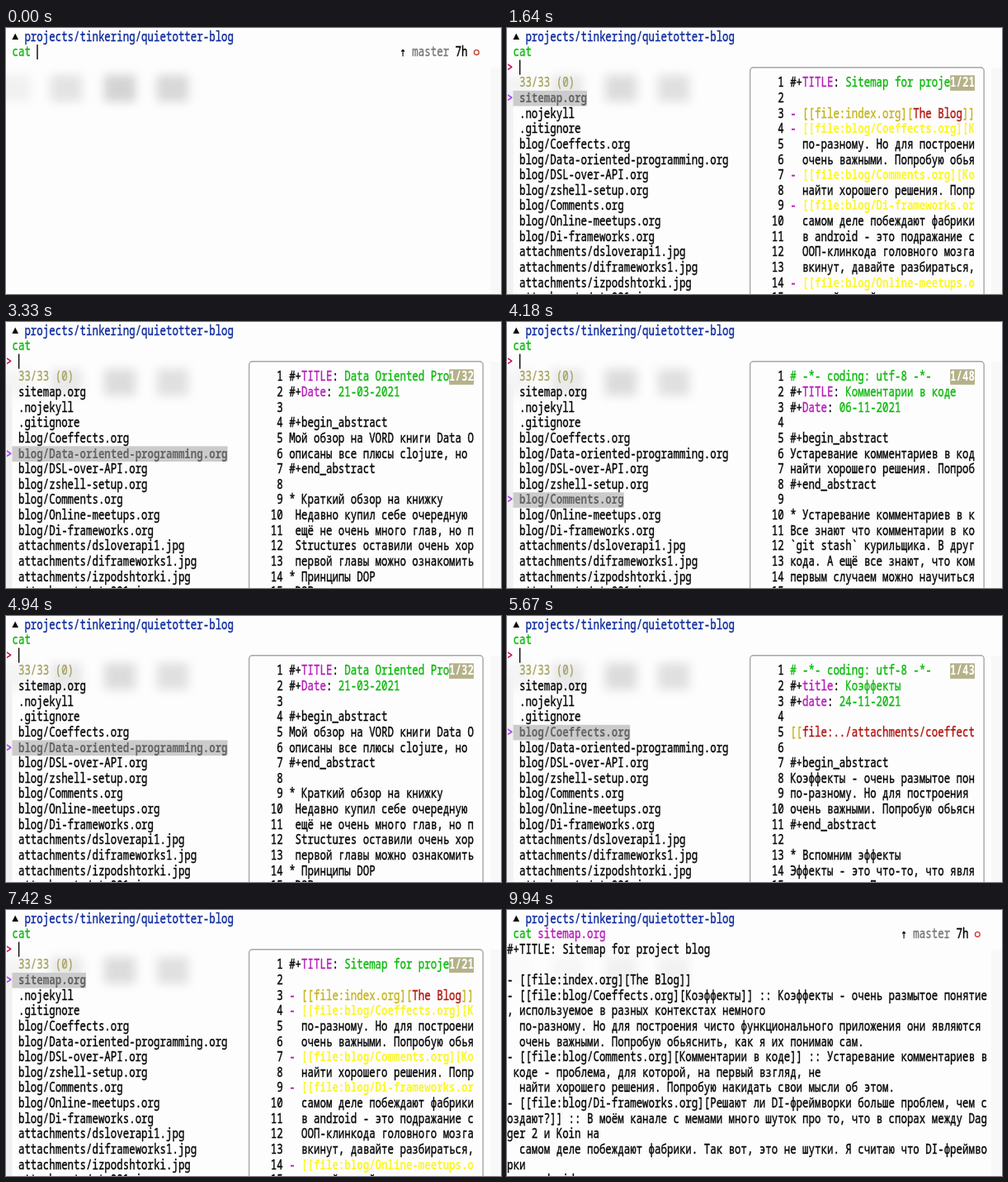
An HTML page with a canvas for the animation above (10000 ms loop, 600 px wide and 322 px high).

```html
<!DOCTYPE html>
<html lang="ru">
<head>
<meta charset="utf-8">
<title>Terminal file picker</title>
<style>
  html, body { margin: 0; width: 100%; height: 100%; overflow: hidden; background: #fefdfe; }
  canvas { display: block; width: 100%; height: 100%; }
</style>
</head>
<body>
<canvas id="stage" width="600" height="322"></canvas>
<script>
const ctx = document.getElementById('stage').getContext('2d');
const LOOP = 10000, CELL = 7.46, ROW = 18.62, BASELINE = 15.6;
const PREVIEW_COLUMNS = 30;
const FACE = "15.4px 'Noto Sans Mono', 'DejaVu Sans Mono', monospace";
const INK = '#050505', BLUE = '#0c2a9c', GREEN = '#0cba0c', MAGENTA = '#b61cb8',
      OLIVE = '#a5a35f', GOLD = '#c3b41c', YELLOW = '#fbf62e', RED = '#b3160f', PURPLE = '#a337f5';

const FILES = ['sitemap.org', '.nojekyll', '.gitignore', 'blog/Coeffects.org',
  'blog/Data-oriented-programming.org', 'blog/DSL-over-API.org', 'blog/zshell-setup.org',
  'blog/Comments.org', 'blog/Online-meetups.org', 'blog/Di-frameworks.org',
  'attachments/dsloverapi1.jpg', 'attachments/diframeworks1.jpg',
  'attachments/izpodshtorki.jpg', 'attachments/mts001.jpg'];

const SITEMAP = `#+TITLE: Sitemap for project blog

- [[file:index.org][The Blog]]
- [[file:blog/Coeffects.org][Коэффекты]] :: Коэффекты - очень размытое понятие, используемое в разных контекстах немного
  по-разному. Но для построения чисто функционального приложения они являются
  очень важными. Попробую обьяснить, как я их понимаю сам.
- [[file:blog/Comments.org][Комментарии в коде]] :: Устаревание комментариев в коде - проблема, для которой, на первый взгляд, не
  найти хорошего решения. Попробую накидать свои мысли об этом.
- [[file:blog/Di-frameworks.org][Решают ли DI-фреймворки больше проблем, чем создают?]] :: В моём канале с мемами много шуток про то, что в спорах между Dagger 2 и Koin на
  самом деле побеждают фабрики. Так вот, это не шутки. Я считаю что DI-фреймворки
  в android - это подражание светлым идеям
  ООП-клинкода головного мозга
  вкинут, давайте разбираться,
- [[file:blog/Online-meetups.org][Онлайн
  первый онлайн митап`;

// Previews by list position: number of lines in the file and its beginning
const PREVIEWS = [
  [21, SITEMAP],
  [0, ''],
  [3, ''],
  [43, `# -*- coding: utf-8 -*-
#+title: Коэффекты
#+date: 24-11-2021

[[file:../attachments/coeffects.jpg]]

#+begin_abstract
Коэффекты - очень размытое понятие
по-разному. Но для построения
очень важными. Попробую обьяснить
#+end_abstract

* Вспомним эффекты
Эффекты - это что-то, что является
результатом. Про`],
  [32, `#+TITLE: Data Oriented Programming
#+Date: 21-03-2021

#+begin_abstract
Мой обзор на VORD книги Data Oriented
описаны все плюсы clojure, но
#+end_abstract

* Краткий обзор на книжку
 Недавно купил себе очередную
 ещё не очень много глав, но п
 Structures оставили очень хорошее
 первой главы можно ознакомиться
* Принципы DOP
 DOP`],
  [40, `#+TITLE: DSL over API\n\n#+begin_abstract\n#+end_abstract`],
  [40, `#+TITLE: zshell setup\n\n#+begin_abstract\n#+end_abstract`],
  [48, `# -*- coding: utf-8 -*-
#+TITLE: Комментарии в коде
#+Date: 06-11-2021

#+begin_abstract
Устаревание комментариев в коде
найти хорошего решения. Попробую
#+end_abstract

* Устаревание комментариев в коде
Все знают что комментарии в коде
\`git stash\` курильщика. В других
кода. А ещё все знают, что комментарии
первым случаем можно научиться
писать`],
].map(([total, body]) => ({ total, lines: body ? body.split('\n') : [] }));

const OUTPUT = SITEMAP.split('\n').flatMap(line => line.match(/.{1,78}/gu) || ['']);

const OPEN = 500, CHOOSE = 8580, RUN = 8880;
const MOVES = [[0, 0], [2580, 1], [2780, 2], [2980, 3], [3160, 4], [3610, 5], [3780, 6], [3950, 7],
  [4500, 6], [4680, 5], [4860, 4], [5580, 3], [6000, 2], [6200, 1], [6940, 0]];

// The typeface is narrowed as a whole so that one glyph fills one terminal cell.
// Regular text gets a hairline outline for a medium weight.
function text(value, col, row, color = INK, bold = false) {
  ctx.font = `${bold ? 700 : 500} ${FACE}`;
  ctx.fillStyle = ctx.strokeStyle = color;
  ctx.lineWidth = 0.4;
  ctx.save();
  ctx.translate(col * CELL, BASELINE + row * ROW);
  ctx.scale(CELL / ctx.measureText('M').width, 1);
  ctx.fillText(value, 0, 0);
  if (!bold) ctx.strokeText(value, 0, 0);
  ctx.restore();
}

function fillCells(col, row, count, color) {
  ctx.fillStyle = color;
  ctx.fillRect(col * CELL, 1.4 + row * ROW, count * CELL, ROW);
}

function cursor(col, row) {
  ctx.fillStyle = INK;
  ctx.fillRect(col * CELL, 1.4 + row * ROW, 1.4, ROW - 0.6);
}

function backdrop(strength) {
  ctx.fillStyle = '#fefdfe';
  ctx.fillRect(0, 0, 600, 322);
  ctx.fillStyle = '#f8f8f8';
  ctx.fillRect(587, 48, 13, 274);
  ctx.save();
  ctx.filter = 'blur(6px)';
  ctx.fillStyle = '#c9c9c9';
  [[-8, 0.25], [54, 0.55], [119, 0.9], [183, 0.8]].forEach(([x, alpha]) => {
    ctx.globalAlpha = alpha * strength;
    ctx.fillRect(x, 57, 38, 32);
  });
  ctx.restore();
}

function header() {
  ctx.fillStyle = INK;
  ctx.beginPath();
  ctx.moveTo(11.2, 6.5);
  ctx.lineTo(15, 14);
  ctx.lineTo(7.4, 14);
  ctx.fill();
  text('projects/tinkering/quietotter-blog', 3, 0, BLUE);
  text('cat', 1, 1, GREEN);
}

function gitStatus() {
  text('⇡', 64, 1);
  text('master', 66, 1, '#777');
  text('7h', 73, 1);
  ctx.strokeStyle = '#c5382c';
  ctx.lineWidth = 1.3;
  ctx.beginPath();
  ctx.arc(570.3, 29.6, 2.9, 0, Math.PI * 2);
  ctx.stroke();
}

// Splits a line into [text, color, bold] parts.
function highlight(line) {
  const keyword = line.match(/^(#\+)(title|date)(:)(.*)/i);
  if (keyword) return [INK, MAGENTA, INK, GREEN].map((color, i) => [keyword[i + 1], color]);
  if (line.startsWith('# ')) return [[line, GREEN]];
  if (line.startsWith('- [[file:index'))
    return [['- ', MAGENTA], ['[[file:index.org][', GOLD], ['The Blog', RED], [']]', GOLD]];
  if (line.startsWith('- [[')) return [['- ', MAGENTA], [line.slice(2), YELLOW, true]];
  if (line.startsWith('[[')) return [['[[', GOLD], [line.slice(2), RED]];
  return [[line, INK]];
}

function preview({ total, lines }) {
  ctx.strokeStyle = '#a6a6a6';
  ctx.lineWidth = 1.4;
  ctx.beginPath();
  ctx.roundRect(39.5 * CELL, 47.7, 38 * CELL, 300, 4);
  ctx.stroke();
  lines.forEach((line, i) => {
    const row = 3 + i;
    text(String(i + 1).padStart(2), 43, row);
    let col = 46;
    for (const [part, color, bold] of highlight(line.slice(0, PREVIEW_COLUMNS))) {
      text(part, col, row, color, bold);
      col += part.length;
    }
  });
  if (total) {
    fillCells(72, 3, 4, '#b5b28a');
    text(`1/${total}`.padStart(4), 72, 3, '#fff', true);
  }
}

function picker(selected) {
  text('>', 0, 2, '#c4105c', true);
  cursor(2, 2);
  text('33/33 (0)', 2, 3, OLIVE);
  ctx.fillStyle = '#f1f1f1';
  ctx.fillRect(0, 76, CELL, 246);
  FILES.forEach((name, i) => {
    const row = 4 + i, current = i === selected;
    if (current) {
      fillCells(1, row, name.length + 1, '#cbcbcb');
      text('>', 0, row, PURPLE, true);
    }
    text(name, 2, row, current ? '#666' : INK, current);
  });
  preview(PREVIEWS[selected]);
}

function draw(t) {
  const picking = t >= OPEN && t < CHOOSE;
  backdrop(t >= RUN ? 0.25 : picking ? 0.7 : 0.9);
  header();
  if (picking) {
    picker(MOVES.findLast(([start]) => t >= start)[1]);
    return;
  }
  gitStatus();
  if (t < OPEN) {
    cursor(5, 1);
    return;
  }
  text('sitemap.org', 5, 1, MAGENTA);
  if (t < RUN) cursor(17, 1);
  else OUTPUT.slice(0, 16).forEach((line, i) => text(line, 0, 2 + i));
}

const start = performance.now();
function tick() {
  draw((performance.now() - start) % LOOP);
  requestAnimationFrame(tick);
}
tick();
</script>
</body>
</html>
```
